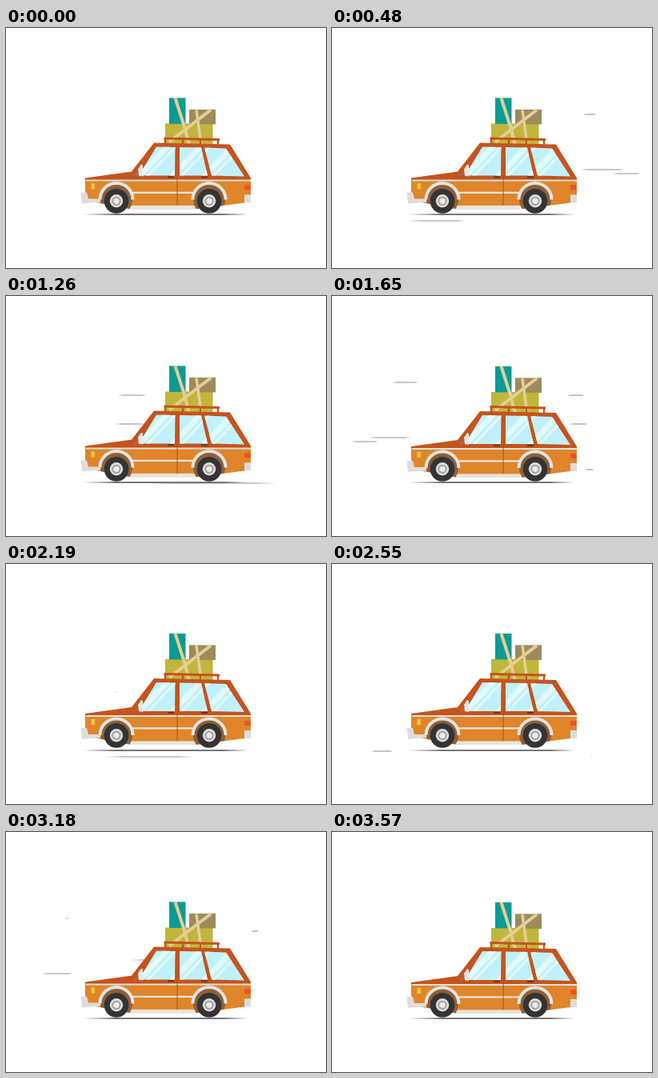
Recreate the animation shown at these times as an HTML page with a canvas. Size 400 px wide and 300 px high, loop 3.6 s.

```html
<!DOCTYPE html>
<html lang="en">
<head>
<meta charset="utf-8">
<title>Road trip</title>
<style>
  html, body { margin: 0; width: 100%; height: 100%; overflow: hidden; background: #fff; }
  canvas { display: block; }
</style>
</head>
<body>
<canvas id="stage" width="400" height="300"></canvas>
<script>
const ctx = document.getElementById('stage').getContext('2d');
const LOOP = 3600, STEP = 30, WIND_CYCLE = 1620, WIND_TIME = 640, WIND_END = 3255;
const RUST = '#c6531d', ORANGE = '#e08529', TRIM = '#e6e4e1', STRAP = '#e5cd96';
const WHEELS = [138, 254];

// Gusts: y, from x, to x, first start, repeat time
const gusts = [
  [108, 75, 330, -83],
  [124, 140, 315, 1118, 1489],
  [160, 137, 319, 555],
  [160, 137, 319, 1118, LOOP / 2],
  [177, 45, 366, -28, 1550],
  [182, 25, 386, -63],
  [198, 93, 387, 606],
  [217, 93, 327, 1073, LOOP / 2],
  [234, 49, 387, 900, 1562],
  [241, 95, 325, 299]
];

// Luggage hops: start, duration, height
const hops = [[853, 240, 30], [2565, 270, 36], [3330, 150, 6]];

const ease = u => (1 - Math.cos(Math.PI * Math.min(1, Math.max(0, u)))) / 2;

function trace(...p) {
  for (let i = 0; i < p.length; i += 2) ctx[i ? 'lineTo' : 'moveTo'](p[i], p[i + 1]);
}

function poly(color, ...p) {
  ctx.fillStyle = color;
  ctx.beginPath();
  trace(...p);
  ctx.fill();
}

function rect(color, x, y, w, h) {
  ctx.fillStyle = color;
  ctx.fillRect(x, y, w, h);
}

function line(color, width, ...p) {
  ctx.strokeStyle = color;
  ctx.lineWidth = width;
  ctx.beginPath();
  trace(...p);
  ctx.stroke();
}

function disc(color, x, y, r) {
  ctx.fillStyle = color;
  ctx.beginPath();
  ctx.arc(x, y, r, 0, 7);
  ctx.fill();
}

// Run a drawing turned about (x, y) and moved by dy
function posed(x, y, dy, angle, paint) {
  ctx.save();
  ctx.translate(x, y + dy);
  ctx.rotate(angle);
  ctx.translate(-x, -y);
  paint();
  ctx.restore();
}

function streak(color, x0, x1, y, width) {
  const g = ctx.createLinearGradient(x0, 0, x1, 0);
  g.addColorStop(0, color + '00');
  g.addColorStop(.2, color);
  g.addColorStop(.85, color);
  g.addColorStop(1, color + '00');
  line(g, width, x0, y, x1, y);
}

function drawWind(t) {
  if (t < STEP || t > WIND_END) return;
  for (const [y, from, to, first, cycle = WIND_CYCLE] of gusts) {
    for (let start = first; start < t; start += cycle) {
      const u = (t - start) / WIND_TIME;
      if (u >= 1) continue;
      const tail = from + (to - from) * ease((u - .25) / .75);
      const head = from + (to - from) * ease(u / .75);
      streak('#b9b7b4', tail - .5, head + .5, y, 1.6);
    }
  }
}

function drawWindows() {
  ctx.save();
  ctx.beginPath();
  trace(166, 184, 188, 148, 211.5, 148.5, 211, 184);
  trace(217, 148.5, 244, 149, 252, 184, 217, 184);
  trace(248, 149, 275, 150, 298, 185, 257, 184);
  ctx.clip();
  rect('#c0f1fb', 160, 140, 145, 50);
  for (const x of [165, 207, 247]) {
    line('#e0fafd', 7, x, 186, x + 38, 146);
    line('#e0fafd', 3, x + 11, 186, x + 49, 146);
  }
  ctx.restore();
}

function drawArch(x) {
  disc('#8c6039', x, 214, 20);
  ctx.strokeStyle = TRIM;
  ctx.lineWidth = 4;
  ctx.beginPath();
  ctx.arc(x, 214, 20.5, Math.PI, 0);
  ctx.stroke();
}

function drawBody() {
  // Roof rack
  line(RUST, 3, 197.5, 137.5, 267, 139);
  for (let x = 199; x < 270; x += 22) line(RUST, 2.5, x, 138, x, 145);

  // Cabin and hood
  poly(RUST, 99, 187, 157, 179, 185, 143, 280, 145, 306, 187, 306, 192, 99, 192);
  drawWindows();

  // Lower panels
  ctx.save();
  ctx.beginPath();
  trace(99, 189, 306, 189, 306, 212, 298, 218, 236, 226, 157, 226, 99, 215);
  ctx.clip();
  rect(ORANGE, 99, 189, 207, 37);
  rect(TRIM, 155, 221.5, 83, 5);
  line(TRIM, 2.2, 100, 190, 306, 190);
  line(TRIM, 2.2, 158, 205.5, 236, 205.5);
  WHEELS.forEach(drawArch);
  ctx.restore();
  line('#a8501f', 1, 214, 185, 214, 221);
  for (const x of [202, 244]) rect('#5b3927', x, 185, 8, 2);

  // Lights and bumpers
  rect('#f8c741', 106.5, 194, 4.5, 7);
  rect('#ed5128', 298, 196, 7.5, 6);
  poly('#dfdddb', 93.5, 205, 101, 205, 103, 213, 118, 213, 118, 217, 95, 219);
  rect('#dfdddb', 298, 208, 8, 10);

  // Wing mirror
  line('#8a7d78', 1.5, 160, 184, 168, 180);
  poly('#e4e7e8', 165, 176, 169, 170, 171, 171, 171, 185, 166, 184);
}

function drawLuggage(lean) {
  rect('#bfb63b', 199, 119, 59.5, 27);
  rect('#9c8b5b', 229, 101.5, 33, 18.5);
  posed(204, 119, 0, lean, () => {
    rect('#0b9b93', 204, 87, 20.5, 32.5);
    line(STRAP, 4, 211.5, 87, 222, 120);
  });
  line(STRAP, 4, 222, 119, 229, 146);
  line(STRAP, 4, 256, 102, 204, 142);
  line(STRAP, 3.6, 238, 102, 244, 146);
}

function drawWheel(x, y) {
  disc('#343434', x, y, 15.4);
  disc('#dedddb', x, y, 8.2);
  disc('#a3a19f', x, y, 5.6);
  disc('#ebebe9', x, y, 3.6);
}

function draw(t) {
  rect('#fff', 0, 0, 400, 300);
  drawWind(t);
  streak('#77777f', 96, 303, 233, 2.2);

  let lift = 0;
  for (const [start, time, height] of hops) {
    const u = (t - start) / time;
    if (u > 0 && u < 1) lift = 4 * height * u * (1 - u);
  }
  const shake = Math.sin(t / 120 * 2 * Math.PI);
  const rumble = .4 - .5 * shake;
  const bodyLift = lift * .18;
  const lean = lift * .0024;

  posed(199, 119, rumble - lift, lean, () => drawLuggage(lean));
  posed(254, 216, rumble - bodyLift, bodyLift * .003, drawBody);
  for (const x of WHEELS) drawWheel(x, 216.3 - 2 * Math.max(0, shake));
}

function tick() {
  draw(Math.floor(performance.now() % LOOP / STEP) * STEP);
  requestAnimationFrame(tick);
}
tick();
</script>
</body>
</html>
```
